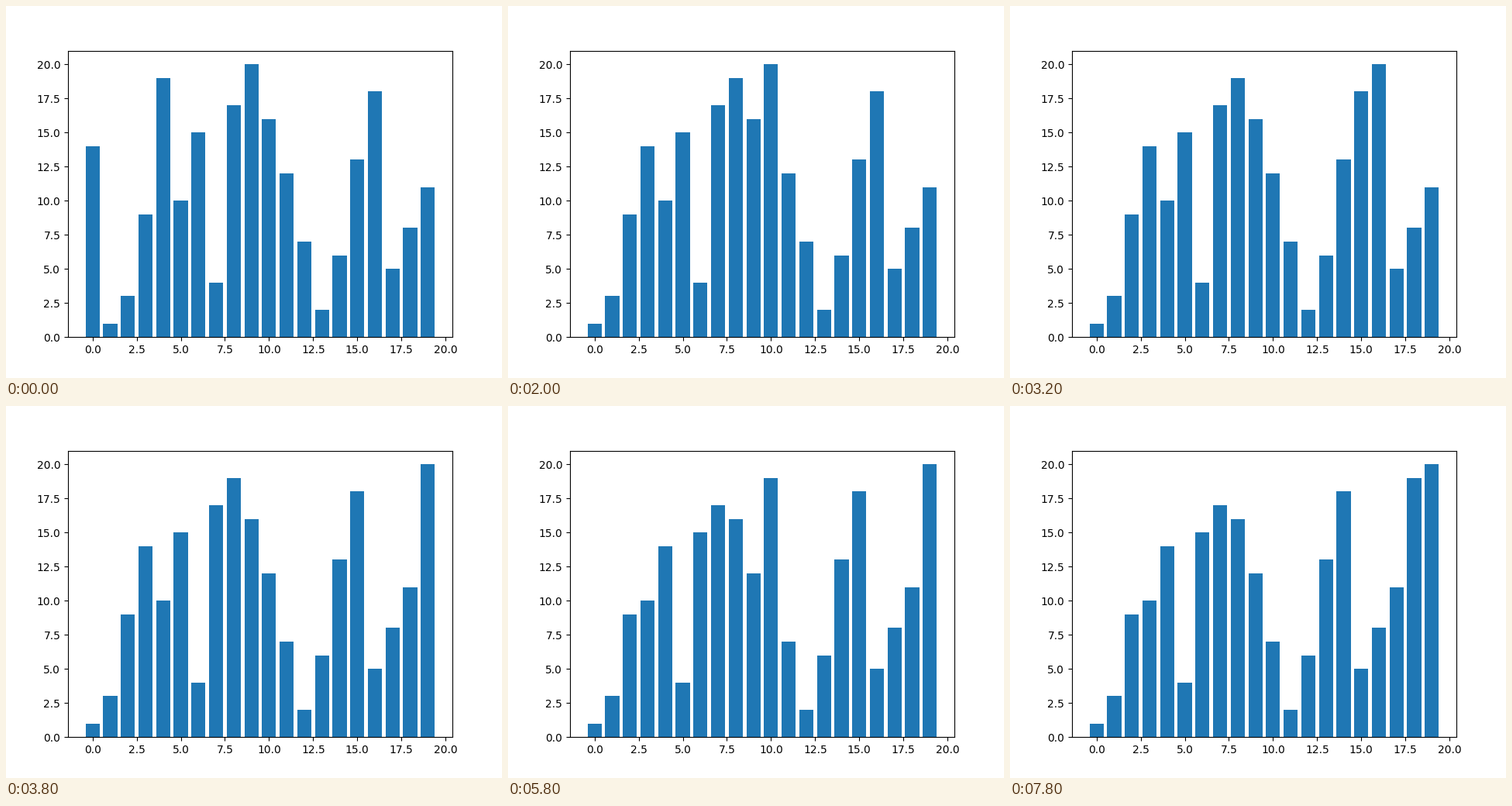
A matplotlib script for the animation above (8 s loop, 640 by 480 pixels).

```python
from itertools import islice

import matplotlib.pyplot as plt
from matplotlib.animation import FuncAnimation

# The shuffled 1..20 that gets sorted; all motion follows from it.
START = (14, 1, 3, 9, 19, 10, 15, 4, 17, 20,
         16, 12, 7, 2, 6, 13, 18, 5, 8, 11)
FRAMES = 40
INTERVAL = 200


def bubble_states(values):
    """Yield the list at the start and after every comparison."""
    items = list(values)
    yield tuple(items)
    for end in range(len(items) - 1, 0, -1):
        for i in range(end):
            items[i:i + 2] = sorted(items[i:i + 2])
            yield tuple(items)


states = list(islice(bubble_states(START), FRAMES))

fig, ax = plt.subplots(figsize=(6.4, 4.8), dpi=100)
bars = ax.bar(range(len(START)), START, color="tab:blue")


def update(frame):
    for bar, height in zip(bars, states[frame]):
        bar.set_height(height)
    return bars.patches


anim = FuncAnimation(fig, update, frames=FRAMES, interval=INTERVAL,
                     init_func=lambda: update(0), repeat=True, blit=False)
plt.show()
```
